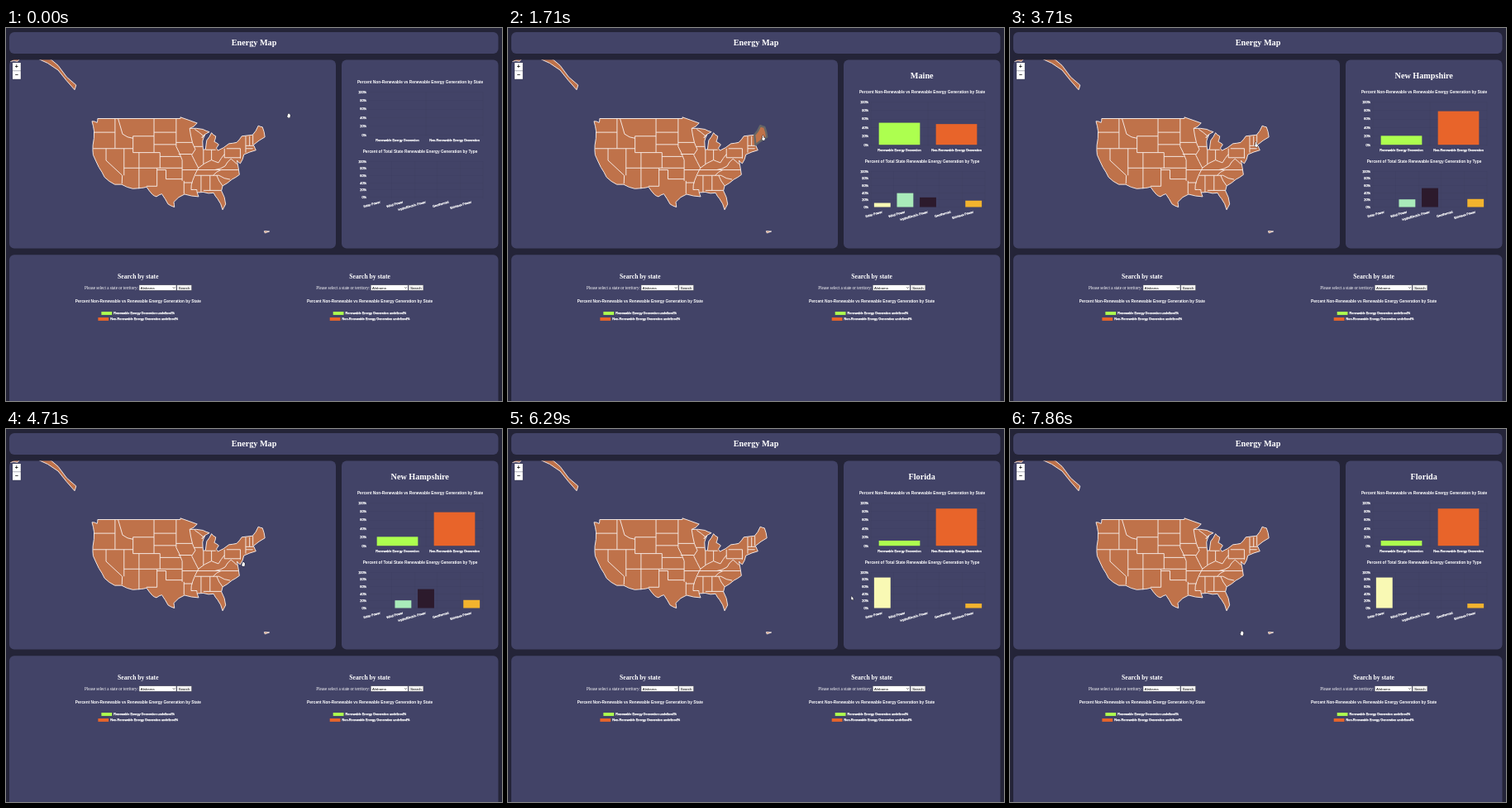
Recreate the animation shown at these times as an HTML page with a canvas. Size 600 by 451 pixels, loop 8000 ms.

```html
<!DOCTYPE html>
<html lang="en">
<head>
<meta charset="utf-8">
<title>Energy Map</title>
<style>
html, body { margin: 0; width: 100%; height: 100%; overflow: hidden; background: #242438; }
canvas { display: block; width: 600px; height: 451px; }
</style>
</head>
<body>
<canvas id="stage"></canvas>
<script>
const LOOP = 8000, STEP = 1000 / 7;
const PANEL = '#424367', LAND = '#bf724a', GREEN = '#adff4f', ORANGE = '#e8642a';
const SERIF = '"Liberation Serif", "Times New Roman", serif';
const SANS = '"Liberation Sans", Arial, sans-serif';

const canvas = document.getElementById('stage');
const ctx = canvas.getContext('2d');
const dpr = window.devicePixelRatio || 1;
canvas.width = 600 * dpr;
canvas.height = 451 * dpr;

let seed = 7;
const random = () => (seed = seed * 16807 % 2147483647) / 2147483647;

// Bends every segment a little, so that a few key points read as a coast or river.
function ragged(...pts) {
  const out = [];
  for (let i = 0; i < pts.length; i += 2) {
    const [x, y, x2, y2] = pts.slice(i, i + 4);
    out.push(x, y);
    if (y2 === undefined) break;
    const bend = (random() - .5) * .16;
    out.push((x + x2) / 2 - (y2 - y) * bend, (y + y2) / 2 + (x2 - x) * bend);
  }
  return out;
}

// Map coordinates are degrees west, degrees north.
const pacific = ragged(122.8,49, 123,48.1, 124.7,48.4, 124,46.2, 124.4,42.8, 124.3,40.4,
  122.4,37.2, 120.5,34.5, 117.1,32.5);
const south = ragged(114.8,32.5, 111.1,31.3, 108.2,31.5, 106.5,31.8, 104.5,29.6, 103.2,29,
  101.4,29.8, 99.3,26.8, 97.2,25.9, 97.4,27.4, 93.8,29.7, 89.1,29, 89.6,30.2);
const florida = ragged(87.5,30.3, 84.1,30.1, 82.8,28.4, 81.1,25.1, 80.1,26.8, 81.5,30.7);
const atlantic = ragged(81.1,32.1, 78,33.9, 75.5,35.2, 76.3,39, 75.2,38.2, 74,40.5, 70,41.6);
const maine = ragged(70.8,42.9, 67,44.8, 67.8,47.1, 69.2,47.4, 71.1,45.3);
const lakes = ragged(74.7,45, 76.4,43.5, 79,43.2, 82.7,41.5, 83.2,42.1, 82.4,43, 83.9,43.7,
  83.4,45, 84.8,45.8, 86.4,44, 86.8,41.8, 87.6,41.7, 87.8,43.8, 87,45.3, 88,44.6, 87.6,45.1,
  85.5,46, 87.7,46.6, 92.1,46.8, 89.6,48, 95.2,49.3, 95.2,49);
const alaska = ragged(152,61, 152,60, 149.5,60, 148,60.8, 143,60.5, 136,58.5, 130.5,54.9,
  130,55.8, 136,59.3, 141,60.7);

// Straight borders: [latitude, west, east] and [longitude, north, south]
const parallels = [[45.9,124,117], [42,124.3,111], [45,111,104], [41,111,102], [37,114,94.6],
  [45.9,104,96.6], [43,104,96.6], [40,102,95.3], [32,106.5,103], [36.5,103,100], [34,100,94.6],
  [43.5,96.6,91.2], [40.6,95.8,91.4], [36.5,94.6,75.9], [33,94,91.2], [35,90.2,82.3],
  [42.5,90.6,87.8], [41.7,86.8,83.4], [39.7,80.5,75.2], [42,79.8,75.2], [42,73.4,71], [42.7,73.4,70.8],
  [30.8,87.5,81.5]];
const meridians = [[117,49,42], [120,42,39], [114,42,35], [111,45,41], [109,41,31.3], [104,49,41],
  [102,41,37], [103,37,32], [100,36.5,34], [96.6,49,42.5], [94.6,39.1,33.5], [94,33.5,29.8],
  [88.3,35,30.4], [87.5,41.7,38], [85.3,35,30.8], [84.8,41.7,39.1], [80.5,42,39.7], [75.2,42,39.5],
  [73.4,45,41], [72.1,45,42.7], [71,45.3,42.9]];
const rivers = [
  ragged(116,49, 114.5,45.5, 111,44.5),
  [120,39, 114.6,35, 114.7,32.7],
  ragged(92.1,46.8, 91.2,43.5, 90.2,41.8, 91.4,40.4, 89.2,37, 91.1,33.6, 91.6,31, 89.7,31, 89.6,30.2),
  ragged(89.2,37, 84.8,39.1, 82.5,38.4, 80.5,40.6),
  ragged(96.6,42.5, 94.6,39.1),
  ragged(90.4,46.6, 87.6,45.1),
  ragged(83.1,35, 81.1,32.1),
  ragged(82.3,35, 78.6,33.9),
  ragged(84.3,35, 81.7,36.5),
  ragged(83.7,36.5, 80.3,37.5, 78.3,39.4, 76.3,38)
];

const mercator = lat => Math.log(Math.tan(Math.PI / 4 + lat * Math.PI / 360)) * 180 / Math.PI;

function trace(path, pts) {
  for (let i = 0; i < pts.length; i += 2)
    path[i ? 'lineTo' : 'moveTo'](104 + (124.7 - pts[i]) * 3.625,
      109.5 + (mercator(49) - mercator(pts[i + 1])) * 3.625);
}
function shape(...parts) {
  const path = new Path2D();
  trace(path, parts.flat());
  path.closePath();
  return path;
}

const land = shape(pacific, south, florida, atlantic, maine, lakes);
land.addPath(shape(alaska));
land.addPath(shape([67.2, 18.5, 65.5, 18.4, 67, 17.9]));
const borders = new Path2D();
for (const [lat, west, east] of parallels) trace(borders, [west, lat, east, lat]);
for (const [lon, north, low] of meridians) trace(borders, [lon, north, lon, low]);
for (const river of rivers) trace(borders, river);
const states = { Maine: shape(maine), Florida: shape(florida, [81.5, 30.8, 87.5, 30.8]) };

const typeNames = ['Solar Power', 'Wind Power', 'HydroElectric Power', 'Geothermal', 'Biomass Power'];
const typeColors = ['#f9f9b4', '#a9ebba', '#2c1a2c', '#888', '#f2b32e'];
const mixNames = ['Renewable Energy Generation', 'Non-Renewable Energy Generation'];
const selections = [
  { at: 745, until: 2560, name: 'Maine', mix: [.515, .485], types: [.115, .39, .27, 0, .18] },
  { at: 2781, until: 4420, name: 'New Hampshire', mix: [.21, .785], types: [0, .215, .53, 0, .225] },
  { at: 5374, until: 5700, name: 'Florida', mix: [.12, .87], types: [.855, 0, 0, 0, .125] }
];
// time, x, y of the pointer
const route = [[0, 342, 106], [860, 309, 133], [2430, 309, 133], [2860, 298, 141], [4290, 298, 141],
  [5430, 263, 213], [5570, 263, 213], [6290, 416.5, 204.5], [6860, 588, 140], [7860, 280.5, 247],
  [LOOP, 280.5, 247]];

function text(str, x, y, font, align = 'center', color = '#fff') {
  ctx.font = font;
  ctx.textAlign = align;
  ctx.fillStyle = color;
  ctx.fillText(str, x, y);
}
// Small labels get a hairline outline to stay bright.
function label(str, x, y, align) {
  text(str, x, y, '3.84px ' + SANS, align);
  ctx.strokeStyle = '#fff';
  ctx.lineWidth = .25;
  ctx.strokeText(str, x, y);
}
function rect(x, y, w, h, color) {
  ctx.fillStyle = color;
  ctx.fillRect(x, y, w, h);
}
function panel(x, y, w, h) {
  ctx.beginPath();
  ctx.roundRect(x, y, w, h, 6);
  ctx.fillStyle = PANEL;
  ctx.fill();
}
function control(x, y, w, h, fill) {
  rect(x, y, w, h, '#767676');
  rect(x + .4, y + .4, w - .8, h - .8, fill);
}

function drawMap(hover) {
  ctx.save();
  ctx.beginPath();
  ctx.roundRect(4, 38.5, 395, 228, 6);
  ctx.clip();
  ctx.lineJoin = 'round';
  ctx.fillStyle = LAND;
  ctx.fill(land);
  ctx.strokeStyle = '#f7ede8';
  ctx.lineWidth = .95;
  ctx.stroke(land);
  ctx.stroke(borders);
  if (hover && states[hover.name]) {
    ctx.strokeStyle = '#666';
    ctx.lineWidth = 2.4;
    ctx.stroke(states[hover.name]);
  }
  ctx.restore();
  rect(7.5, 41.5, 10.8, 20.8, '#34354f');
  ['+', '−'].forEach((sign, i) => {
    rect(8, 42 + 10.1 * i, 9.8, 9.7, '#fff');
    text(sign, 12.9, 49.4 + 9.9 * i, 'bold 7px ' + SANS, 'center', '#111');
  });
}

function drawChart(title, top, height, colors, values) {
  const left = 439, width = 138, bottom = top + height, slot = width / colors.length;
  text(title, 501, top - 10.8, 'bold 4.8px ' + SANS);
  for (let i = 0; i <= 5; i++) {
    const y = bottom - height * i / 5;
    rect(left - 2, y - .2, width + 2, .4, 'rgba(0,0,0,.08)');
    label(i * 20 + '%', 436, y + 1.3, 'right');
  }
  for (let i = 0; i <= colors.length; i++)
    rect(left + slot * i - .2, top, .4, height + 2, 'rgba(0,0,0,.06)');
  colors.forEach((color, i) => {
    const h = height * values[i];
    rect(left + slot * (i + .14), bottom - h, slot * .72, h, color);
  });
}

function drawCharts(t) {
  const pick = selections.filter(s => t >= s.at).pop();
  const p = pick ? Math.min(1, (t - pick.at) / 1000) : 0;
  const grow = 1 - (1 - p) ** 4;
  const values = key => pick ? pick[key].map(v => v * grow) : [0, 0, 0, 0, 0];
  ctx.save();
  if (pick) text(pick.name, 500.7, 61.2, 'bold 10.2px ' + SERIF);
  else ctx.translate(0, -12);
  drawChart('Percent Non-Renewable vs Renewable Energy Generation by State',
    89.5, 51.7, [GREEN, ORANGE], values('mix'));
  mixNames.forEach((name, i) => label(name, 473.5 + 69 * i, 148.5, 'center'));
  drawChart('Percent of Total State Renewable Energy Generation by Type',
    173.3, 43.2, typeColors, values('types'));
  typeNames.forEach((name, i) => {
    ctx.save();
    ctx.translate(452.4 + 27.6 * i, 221.8);
    ctx.rotate(-.28);
    label(name, 0, 1.8, 'right');
    ctx.restore();
  });
  ctx.restore();
}

function drawSearch(dx) {
  ctx.save();
  ctx.translate(dx, 0);
  text('Search by state', 159.8, 302.6, 'bold 7.65px ' + SERIF);
  text('Please select a state or territory:', 95, 315.8, '5.1px ' + SERIF, 'left');
  control(161, 310.6, 45, 6.8, '#fff');
  text('Alabama', 162.8, 315.6, '4.27px ' + SANS, 'left', '#111');
  ctx.strokeStyle = '#111';
  ctx.lineWidth = .6;
  ctx.stroke(new Path2D('M201.8 313.3l1.3 1.4 1.3-1.4'));
  control(206.6, 310.6, 18, 6.8, '#efefef');
  text('Search', 215.6, 315.6, '4.27px ' + SANS, 'center', '#111');
  text('Percent Non-Renewable vs Renewable Energy Generation by State',
    159.8, 331.7, 'bold 4.8px ' + SANS);
  mixNames.forEach((name, i) => {
    rect(115.4 - 4 * i, 343 + 7 * i, 12.8, 3.9, i ? ORANGE : GREEN);
    label(name + ' undefined%', 130.2 - 4 * i, 346.2 + 7 * i, 'left');
  });
  ctx.restore();
}

const cursors = {
  arrow: new Path2D('M-1.2-2.6V2L-.2 1.2.5 2.8 1.2 2.5.5 1H1.9Z'),
  point: new Path2D('M-1.1-2.8Q-.5-3.4 0-2.8V-.7L2 0 1.4 2.8H-.9L-2.3.6-1.1.4Z'),
  grab: new Path2D('M-1.2-1.8Q.3-3.2 1.4-1.6L2-.8 1.4 2.4H-.8L-2.3.3-1.2.2Z')
};
function drawCursor(t, hover) {
  const i = route.findIndex(k => k[0] > t);
  const [t0, x0, y0] = route[i - 1], [t1, x1, y1] = route[i];
  const p = (t - t0) / (t1 - t0), ease = p * p * (3 - 2 * p);
  const x = x0 + (x1 - x0) * ease, y = y0 + (y1 - y0) * ease;
  const path = cursors[x > 399 ? 'arrow' : hover ? 'point' : 'grab'];
  ctx.save();
  ctx.translate(x, y);
  ctx.strokeStyle = '#1b1b24';
  ctx.lineWidth = .9;
  ctx.stroke(path);
  ctx.fillStyle = '#fff';
  ctx.fill(path);
  ctx.restore();
}

function draw(t) {
  ctx.setTransform(dpr, 0, 0, dpr, 0, 0);
  rect(0, 0, 600, 451, '#242438');
  panel(4, 5, 591.5, 26);
  panel(4, 38.5, 395, 228);
  panel(406, 38.5, 189.5, 228);
  panel(4, 274.2, 591.5, 190);
  text('Energy Map', 300, 21.2, 'bold 10.2px ' + SERIF);
  const hover = selections.find(s => t >= s.at && t < s.until);
  drawMap(hover);
  drawCharts(t);
  drawSearch(0);
  drawSearch(280.3);
  drawCursor(t, hover);
}

const start = performance.now();
function tick() {
  const t = (performance.now() - start) % LOOP;
  draw(Math.floor((t + 5) / STEP) % 56 * STEP);
  requestAnimationFrame(tick);
}
tick();
</script>
</body>
</html>
```
